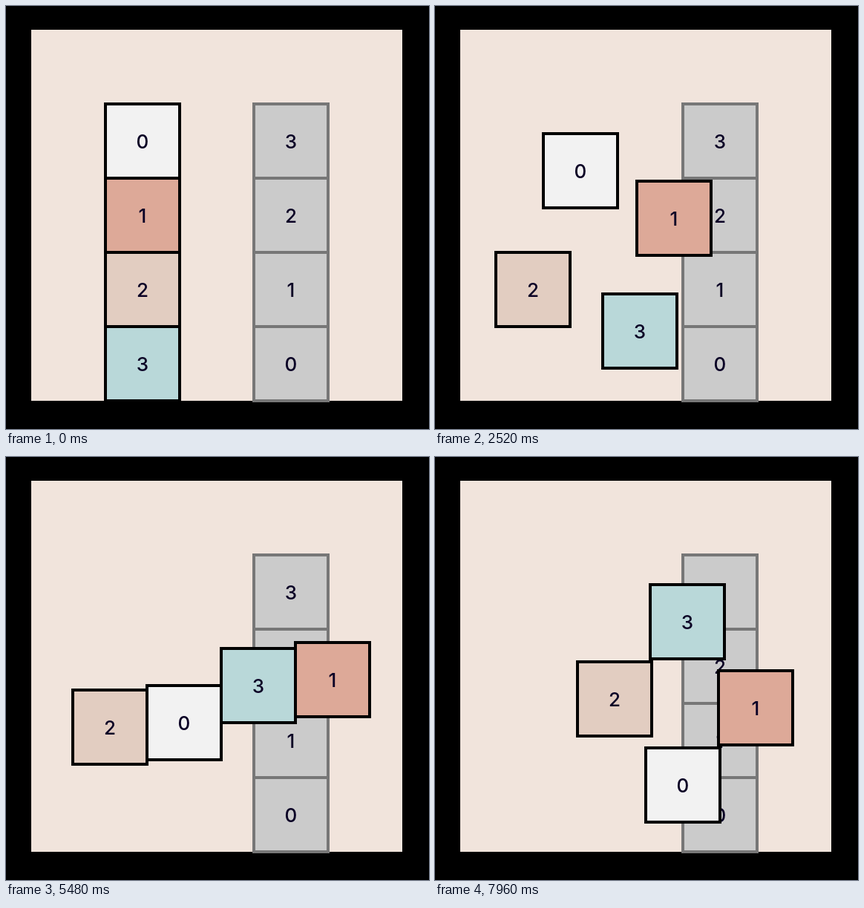
An HTML page that plays this animation: 570x570 px, repeating every 8000 ms.

```html
<!DOCTYPE html>
<html lang="en">
<head>
<meta charset="utf-8">
<title>Reversing a stack of blocks</title>
<style>
  html, body { margin: 0; height: 100%; overflow: hidden; background: #000; }
  svg { display: block; width: 100vw; height: 100vh; }
  rect { stroke-width: 4; }
  text { font: 500 26px Inter, Roboto, sans-serif; fill: #0a0025; text-anchor: middle; }
</style>
</head>
<body>
<svg id="stage" viewBox="0 0 570 570">
  <path d="M34 32h500v500h-500z" fill="#f1e4dc"/>
</svg>
<script>
const LOOP = 8000, TICK = 40, GRID = 2, SIZE = 100;
const SPREAD = 1680, JOIN = 4080, PART = 6040, END = 7960;
const ROW_LEFT = 112, ROW_DRIFT = 39;

// Blocks leave the stack, drift right as a touching row (slot = place in it), then part.
const blocks = [
  { fill: '#f2f2f2', slot: 1, spread: [186, 188], rowY: [285, 387], end: [334, 442] },
  { fill: '#dda998', slot: 3, spread: [272, 288], rowY: [281, 308], end: [432, 338] },
  { fill: '#e2cdc1', slot: 0, spread: [142, 382], rowY: [381, 357], end: [242, 326] },
  { fill: '#b9d8d9', slot: 2, spread: [256, 468], rowY: [381, 279], end: [340, 222] }
];

const stage = document.getElementById('stage');
const stackY = level => 182 + SIZE * level;
const snap = value => Math.round(value / GRID) * GRID;
const mix = (a, b, k) => a + (b - a) * k;

function addBlock(label, fill, stroke) {
  const group = document.createElementNS('http://www.w3.org/2000/svg', 'g');
  group.innerHTML =
    `<rect x="${-SIZE / 2}" y="${-SIZE / 2}" width="${SIZE}" height="${SIZE}" fill="${fill}" stroke="${stroke}"/>` +
    `<text y="10">${label}</text>`;
  return stage.appendChild(group);
}

function place(group, x, y) {
  group.setAttribute('transform', `translate(${snap(x)} ${snap(y)})`);
}

for (let i = 0; i < 4; i++) place(addBlock(3 - i, '#cbcbcb', '#777'), 384, stackY(i));

blocks.forEach((block, i) => {
  const rowX = ROW_LEFT + SIZE * block.slot;
  block.group = addBlock(i, block.fill, '#000');
  block.path = [
    [0, 184, stackY(i)],
    [SPREAD, ...block.spread],
    [JOIN, rowX, block.rowY[0]],
    [PART, rowX + ROW_DRIFT, block.rowY[1]],
    [END, ...block.end]
  ];
});

function move({ group, path }, t) {
  const next = Math.max(1, path.findIndex(([time]) => time >= t));
  const [t0, x0, y0] = path[next - 1], [t1, x1, y1] = path[next];
  const k = (t - t0) / (t1 - t0);
  // Neighbours hold each block's height until it has nearly slid clear.
  place(group, mix(x0, x1, k), mix(y0, y1, next === 1 ? k ** 6 : k));
}

const start = performance.now();
function frame() {
  const now = (performance.now() - start) % LOOP;
  const t = Math.floor(now / TICK) * TICK;
  blocks.forEach(block => move(block, t));
  requestAnimationFrame(frame);
}
frame();
</script>
</body>
</html>
```
